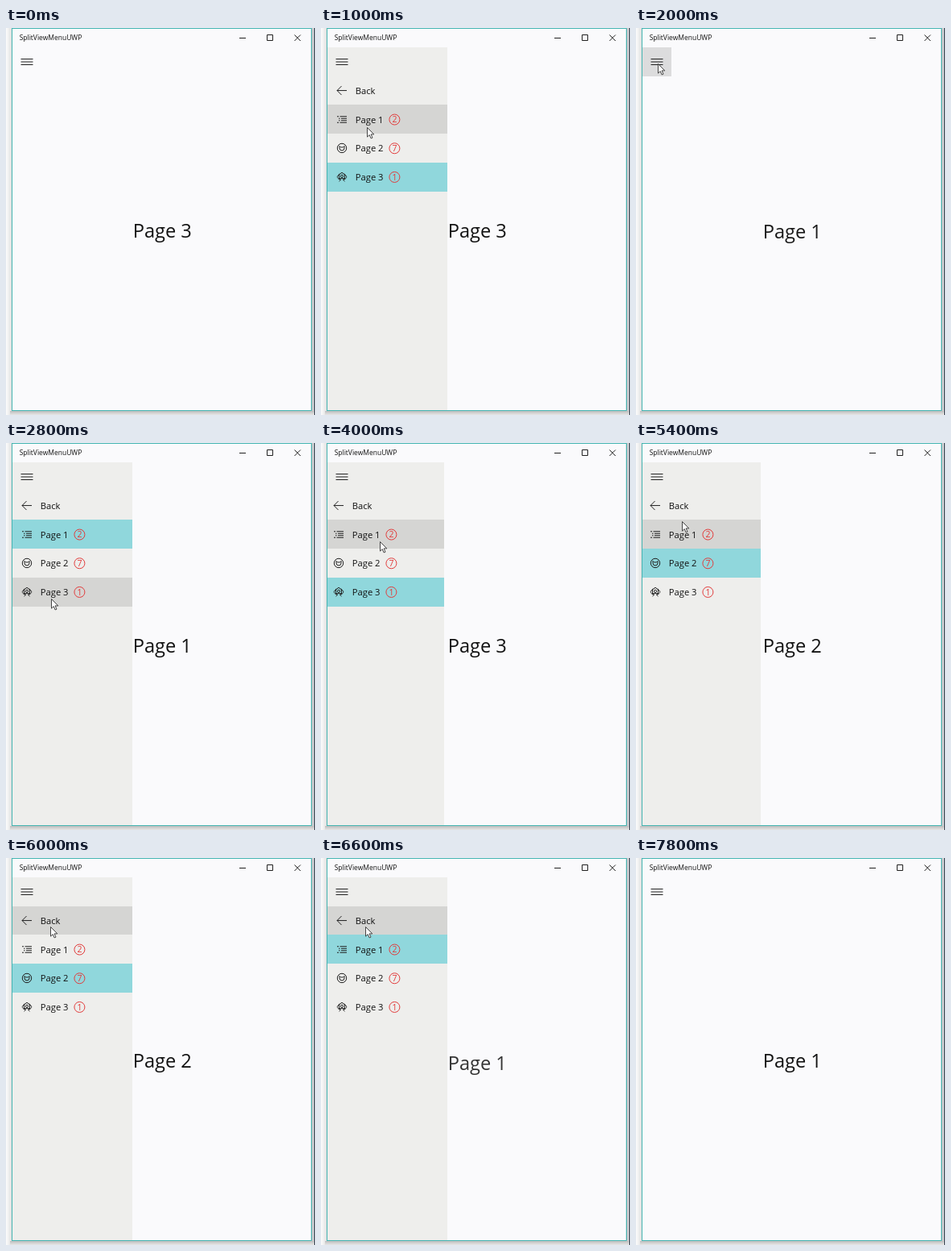
Animation, 384 px wide and 480 px high, one loop 8800 ms. Source, as an HTML page:

```html
<!DOCTYPE html>
<html lang="en">
<head>
<meta charset="utf-8">
<title>Split view menu</title>
<style>
  html, body { margin: 0; width: 100%; height: 100%; overflow: hidden; background: #fff; }
  svg { display: block; width: 384px; height: 480px; }
  text { font-family: "Open Sans", "Noto Sans", sans-serif; fill: #111; }
  rect { shape-rendering: crispEdges; }
  .line { fill: none; stroke: #222; stroke-width: 1; }
  .badge { fill: none; stroke: #e23b3b; stroke-width: 1; }
  .digit { fill: #e23b3b; font-size: 10.5px; text-anchor: middle; }
</style>
</head>
<body>
<svg viewBox="0 0 384 480">
  <defs>
    <linearGradient id="shadeLeft"><stop offset="0" stop-color="#fcfcfc"/><stop offset="1" stop-color="#dcdcdc"/></linearGradient>
    <linearGradient id="shadeDown" x2="0" y2="1"><stop offset="0" stop-color="#bdbdbd"/><stop offset="1" stop-color="#e6e6e6"/></linearGradient>
    <clipPath id="client"><rect x="8" y="24" width="371" height="450"/></clipPath>
  </defs>

  <!-- Window frame -->
  <rect width="8" height="480" fill="url(#shadeLeft)"/>
  <rect x="380" width="4" height="480" fill="#c4c8cc"/>
  <rect x="383" width="1" height="480" fill="#3c4654"/>
  <rect x="5" y="475" width="378" height="5" fill="url(#shadeDown)"/>
  <rect x="7" y="0" width="373" height="475" fill="#45b5b2"/>
  <rect x="8" y="1" width="371" height="473" fill="#fafafc"/>
  <text x="16.7" y="15" font-size="8.5">SplitViewMenuUWP</text>
  <path class="line" d="M290 12.5h8M324.5 8.5h7v7h-7zM358.5 8.5l7.5 7.5m0-7.5l-7.5 7.5"/>

  <text id="page" x="157.7" font-size="23.6"></text>

  <g clip-path="url(#client)">
    <g id="pane">
      <rect x="8" y="24" width="149" height="450" fill="#eeeeec"/>
      <rect id="hover" x="8" width="149" height="35.7" fill="#d5d5d3"/>
      <rect id="selected" x="8" width="149" height="35.7" fill="#90d7dc"/>
      <g id="items"></g>
    </g>
    <rect id="buttonHover" x="8" y="24" width="36" height="36" fill="#000" opacity=".12"/>
    <path class="line" d="M18.5 38.5h15m-15 3.5h15m-15 3.5h15"/>
  </g>

  <path id="cursor" d="M0 0v11.6l2.7-2.5 1.9 4.3 1.9-.8-1.9-4.2h3.7z" fill="#fff" stroke="#333" stroke-width=".9"/>
</svg>

<script>
const LOOP = 8800, STEP = 200, ROW = 35.7, TOP = 24, PANE = 149;
const $ = id => document.getElementById(id);

// Icons are drawn around their own centre.
const entries = [
  { label: 'Back', icon: 'M6-.0H-6M-.5-5.5L-6 0l5.5 5.5' },
  { label: 'Page 1', badge: 2, icon: 'M-6-3.5h2m1.5 0H6M-4-1h1.5m1.5 0H6M-4 1.5h1.5m1.5 0H6M-6 4h2m1.5 0H6' },
  { label: 'Page 2', badge: 7, icon: 'M-5.7 0a5.7 5.7 0 1 0 11.4 0a5.7 5.7 0 1 0-11.4 0M-3-2.5v2.5a3 3 0 0 0 6 0v-2.5l-1.5 1.5h-3z' },
  { label: 'Page 3', badge: 1, icon: 'M-3.5-3.5h1.5l1-1.5h2l1 1.5h1.5v5.5h-7zM-1.6-.8a1.6 1.6 0 1 0 3.2 0a1.6 1.6 0 1 0-3.2 0M-4-2.5c-3 2-2 5 2.5 6M-3.5 1.8l2 1.8-2 1.8M4-2.5c3 2 2 5-2.5 6M3.5 1.8l-2 1.8 2 1.8' }
];

$('items').innerHTML = entries.map(({ label, icon, badge }, i) => {
  const y = TOP + ROW * (i + 1.5);
  const number = badge ? `<circle class="badge" cx="91.4" cy="${y + .3}" r="6.5"/>
    <text class="digit" x="91.4" y="${y + 4.1}">${badge}</text>` : '';
  return `<path class="line" transform="translate(26 ${y})" d="${icon}"/>
    <text x="42.8" y="${y + 4.4}" font-size="11.2">${label}</text>${number}`;
}).join('');

// [time, page shown]
const pages = [[-1000, 3], [1660, 1], [3119, 3], [4719, 2], [6009, 3], [6409, 1]];

// [time, pane open]
const toggles = [[-1000, 0], [520, 1], [1570, 0], [2170, 1], [3170, 0],
  [3791, 1], [4570, 0], [5151, 1], [7370, 0]];

// [time, x, y]
const pointer = [[200, 60, 80], [400, 28, 44], [600, 28, 44], [1000, 57, 123], [1400, 57, 123],
  [1600, 55, 117], [2000, 27, 44], [2200, 27, 44], [2800, 56, 193], [3200, 55, 190],
  [3600, 27, 44], [3800, 28, 46], [4000, 73, 122], [4200, 66, 148], [4600, 62, 152],
  [5000, 27, 44], [5200, 30, 48], [5400, 57, 97], [5600, 55, 85], [6600, 55, 85],
  [7000, 30, 46], [7600, 27, 44]];

const latest = (track, t) => track.findLast(([start]) => start <= t);
const decay = (elapsed, halfLife) => 2 ** (-elapsed / halfLife);

function pointerAt(t) {
  const next = pointer.findIndex(([time]) => time >= t);
  if (t < pointer[0][0] || next < 0) return null;
  const [t1, x1, y1] = pointer[next];
  const [t0, x0, y0] = pointer[Math.max(0, next - 1)];
  const k = t1 > t0 ? (t - t0) / (t1 - t0) : 1;
  return { x: x0 + (x1 - x0) * k, y: y0 + (y1 - y0) * k };
}

function show(element, visible) {
  element.style.display = visible ? '' : 'none';
}

function draw(t) {
  const [shownAt, page] = latest(pages, t);
  const rise = 20 * decay(t - shownAt, 70);
  $('page').textContent = `Page ${page}`;
  $('page').setAttribute('y', 259.5 + Math.round(rise));
  $('page').setAttribute('opacity', 1 - rise / 20);

  const [toggledAt, open] = latest(toggles, t);
  const left = open ? decay(t - toggledAt, 40) : 1 - decay(t - toggledAt, 25);
  $('pane').setAttribute('transform', `translate(${-Math.round(PANE * left)})`);
  $('selected').setAttribute('y', TOP + ROW * (page + 1));

  const point = pointerAt(t);
  const row = point ? Math.floor((point.y - TOP) / ROW) : -1;
  show($('cursor'), point);
  show($('hover'), row > 0);
  show($('buttonHover'), row === 0 && point.x < 44);
  if (!point) return;
  $('hover').setAttribute('y', TOP + ROW * row);
  $('cursor').setAttribute('transform', `translate(${point.x + .5} ${point.y + .5})`);
}

const start = performance.now();
function tick() {
  const t = (performance.now() - start) % LOOP;
  draw(Math.floor(t / STEP) * STEP);
  requestAnimationFrame(tick);
}
tick();
</script>
</body>
</html>
```
